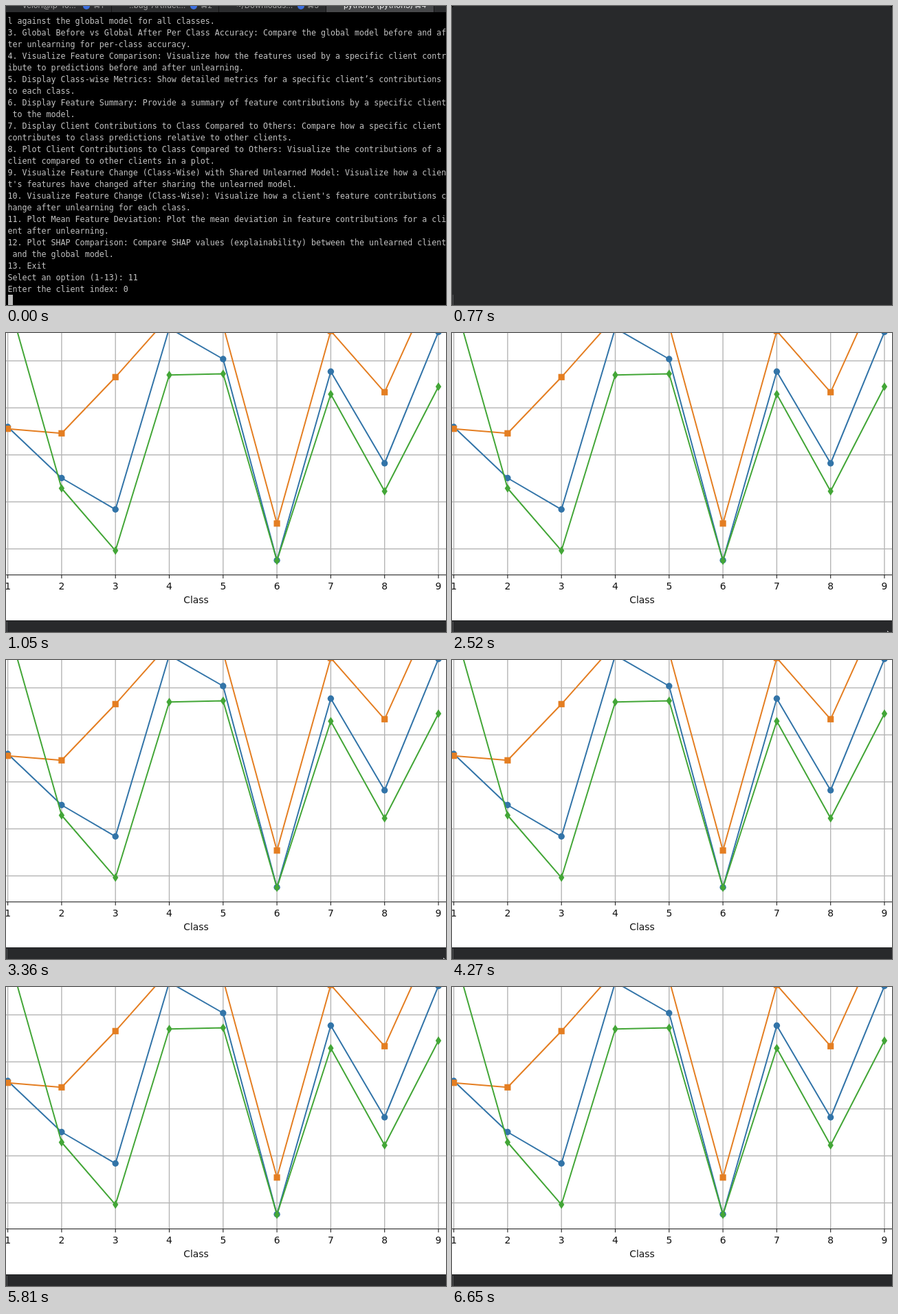
Write an HTML page with a canvas that moves like this. It is 640 px wide and 436 px high and loops after 8000 ms.

```html
<!DOCTYPE html>
<html lang="en">
<head>
<meta charset="utf-8">
<title>Terminal and accuracy plot</title>
<style>
  html, body { margin: 0; width: 640px; height: 436px; overflow: hidden; background: #000; }
  canvas { display: block; }
</style>
</head>
<body>
<canvas id="stage" width="640" height="436"></canvas>
<script>
const ctx = document.getElementById('stage').getContext('2d');
const LOOP = 8000, BLANK_AT = 770, PLOT_AT = 910;
const PANEL = '#28292b';

const menu = `l against the global model for all classes.
3. Global Before vs Global After Per Class Accuracy: Compare the global model before and af
ter unlearning for per-class accuracy.
4. Visualize Feature Comparison: Visualize how the features used by a specific client contr
ibute to predictions before and after unlearning.
5. Display Class-wise Metrics: Show detailed metrics for a specific client’s contributions
to each class.
6. Display Feature Summary: Provide a summary of feature contributions by a specific client
 to the model.
7. Display Client Contributions to Class Compared to Others: Compare how a specific client
contributes to class predictions relative to other clients.
8. Plot Client Contributions to Class Compared to Others: Visualize the contributions of a
client compared to other clients in a plot.
9. Visualize Feature Change (Class-Wise) with Shared Unlearned Model: Visualize how a clien
t's features have changed after sharing the unlearned model.
10. Visualize Feature Change (Class-Wise): Visualize how a client's feature contributions c
hange after unlearning for each class.
11. Plot Mean Feature Deviation: Plot the mean deviation in feature contributions for a cli
ent after unlearning.
12. Plot SHAP Comparison: Compare SHAP values (explainability) between the unlearned client
 and the global model.
13. Exit
Select an option (1-13): 11
Enter the client index: 0`.split('\n');

// title, title x, shortcut x, busy dot x
const tabs = [
  ['velori@ip-10…', 24, 127, 117],
  ['..bug-Artifact…', 179, 283, 273],
  ['~/Downloads…', 335, 438, 429],
  ['python3 (python3)', 491, 594, 0],
];

const series = [
  { color: '#3274a8', marker: circle, ys: [137, 211.5, 257.3, -7, 38, 331.5, 56.3, 190, -1.5] },
  { color: '#e47e22', marker: square, ys: [139.7, 146.3, 64.3, -24, -11, 277.8, -3, 86.3, -87] },
  { color: '#43a637', marker: diamond, ys: [-51, 226.5, 317.3, 61.3, 59.5, 332, 89.3, 230.8, 78.2] },
];

// start, end, x of the pointer tip peeking in at the bottom edge
const peeks = [[2520, 2590, 633], [3290, 3360, 633], [3360, 3430, 636],
               [4200, 4270, 633], [5740, 5810, 633], [6580, 6650, 638]];

const classX = i => 2.6 + 78.3 * i;

function rect(color, x, y, w, h) {
  ctx.fillStyle = color;
  ctx.fillRect(x, y, w, h);
}

function text(str, x, y, font, color, align = 'left') {
  ctx.font = font;
  ctx.fillStyle = color;
  ctx.textAlign = align;
  ctx.fillText(str, x, y);
}

function circle(x, y) { ctx.arc(x, y, 4.7, 0, 2 * Math.PI); }
function square(x, y) { ctx.rect(x - 4.6, y - 4.6, 9.2, 9.2); }
function diamond(x, y) {
  ctx.moveTo(x, y - 6.3);
  ctx.lineTo(x + 4.2, y);
  ctx.lineTo(x, y + 6.3);
  ctx.lineTo(x - 4.2, y);
}

function drawTerminal() {
  rect('#000', 0, 0, 640, 436);
  rect('#2b2c2e', 0, 0, 640, 9);
  rect('#47484a', 466, 0, 156, 9);
  for (const x of [153, 309, 465, 622]) rect('#151515', x, 0, 1, 9);
  tabs.forEach(([title, x, keyX, dotX], i) => {
    const color = i === 3 ? '#f0f0f0' : '#a5a5a5';
    text(title, x, 3, '11.5px Inter, sans-serif', color);
    text('⌘' + (i + 1), keyX, 3, '10.5px Inter, "DejaVu Sans", sans-serif', color);
    if (!dotX) return;
    ctx.fillStyle = '#3c6fe0';
    ctx.beginPath();
    ctx.arc(dotX, 0, 5, 0, 2 * Math.PI);
    ctx.fill();
  });
  menu.forEach((line, i) =>
    text(line, 2.5, 26 + 17 * i, '11.65px "DejaVu Sans Mono", monospace', '#c4c4c4'));
  rect('#bbb', 3, 421, 7, 15);
}

function drawPanel() {
  rect('#000', 0, 0, 640, 436);
  ctx.fillStyle = PANEL;
  ctx.beginPath();
  ctx.roundRect(0, 0, 640, 440, 4);
  ctx.fill();
  rect('#555658', 1, 421, 1, 15);
}

function drawPlot() {
  rect('#fff', 0, 0, 640, 419);
  for (let i = 0; i < 9; i++) rect('#b5b5b5', classX(i) - 0.7, 0, 1.4, 353);
  for (let i = 0; i < 5; i++) rect('#b5b5b5', 0, 39.9 + 68.55 * i, 640, 1.4);

  ctx.lineWidth = 2;
  ctx.lineJoin = 'round';
  for (const { color, marker, ys } of series) {
    ctx.strokeStyle = ctx.fillStyle = color;
    ctx.beginPath();
    ys.forEach((y, i) => ctx.lineTo(classX(i), y));
    ctx.stroke();
    ys.forEach((y, i) => {
      ctx.beginPath();
      marker(classX(i), y);
      ctx.fill();
    });
  }

  const font = '13.9px "DejaVu Sans", sans-serif';
  rect('#222', 0, 352.2, 640, 1.1);
  for (let i = 0; i < 9; i++) {
    rect('#222', classX(i) - 0.55, 353, 1.1, 4.8);
    text(i + 1, classX(i), 373.8, font, '#111', 'center');
  }
  text('Class', 276.5, 393.7, font, '#111', 'center');
}

function drawPeek(x) {
  ctx.fillStyle = '#d0d0d0';
  ctx.beginPath();
  ctx.moveTo(x, 434);
  ctx.lineTo(x + 2.5, 436);
  ctx.lineTo(x, 436);
  ctx.fill();
}

function draw() {
  const t = performance.now() % LOOP;
  if (t < BLANK_AT) {
    drawTerminal();
  } else {
    drawPanel();
    if (t >= PLOT_AT) drawPlot();
    for (const [start, end, x] of peeks) if (t >= start && t < end) drawPeek(x);
  }
  requestAnimationFrame(draw);
}
draw();
</script>
</body>
</html>
```
